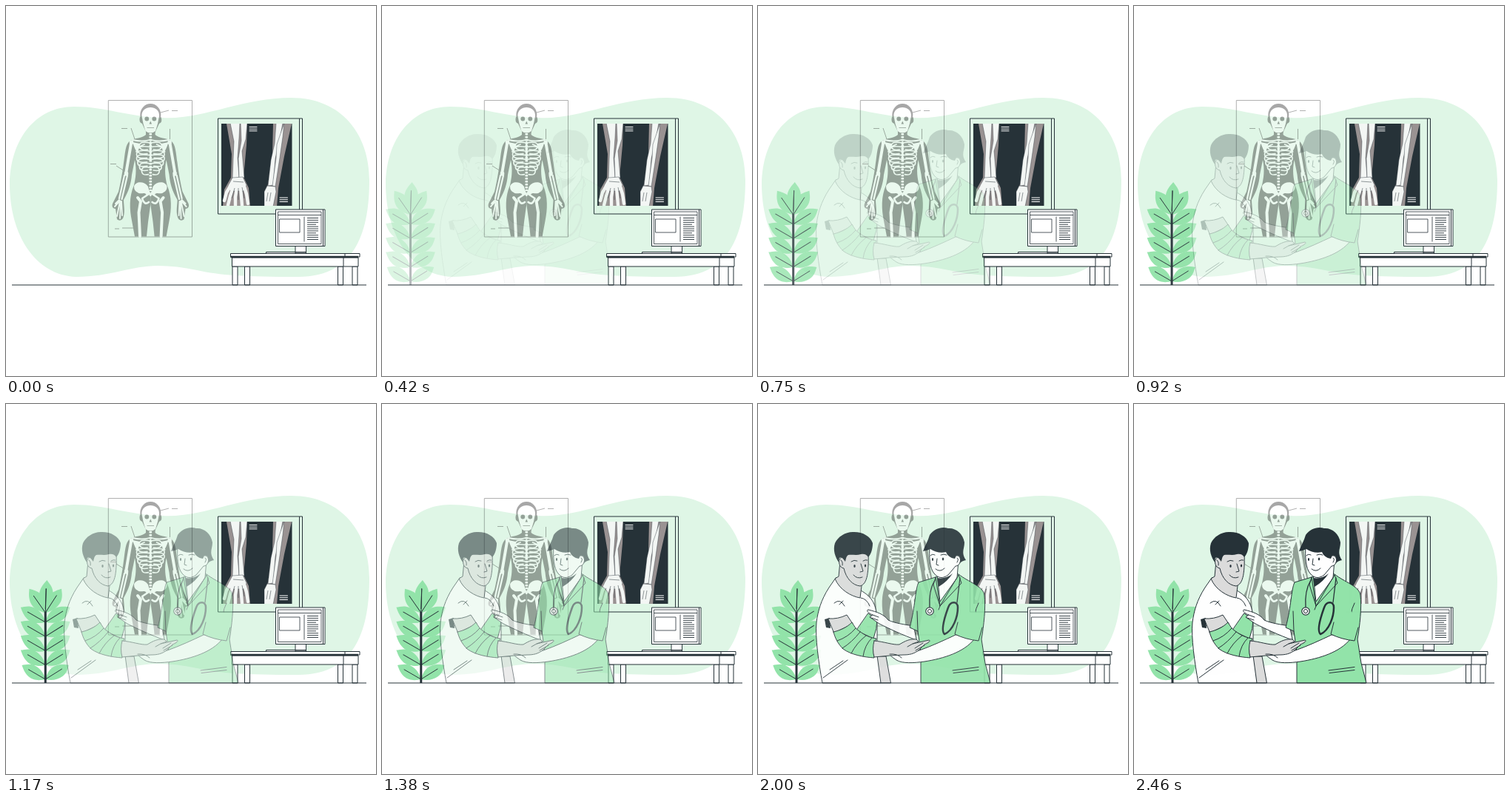
An HTML page that plays this animation: 500x500 px, repeating every 2.54 s.

```html
<!DOCTYPE html>
<html lang="en">
<head>
<meta charset="utf-8">
<title>Examination room</title>
<style>
html, body { margin: 0; height: 100%; overflow: hidden; background: #fff }
svg { display: block; width: 100vw; height: 100vh }
.ln { fill: none; stroke: #263238 }
.w { fill: #fff; stroke: #263238 }
.g { fill: #92e3a9; stroke: #263238 }
.s { fill: #dbdbdb; stroke: #263238 }
.d { fill: #263238 }
.bone { fill: none; stroke: #fff; stroke-linecap: round; stroke-linejoin: round }
</style>
</head>
<body>
<svg viewBox="0 0 500 500">
<defs>
  <g id="leaf">
    <path fill="#92e3a9" d="M0 0C-5-5-11-13-9-23C-7-31-3-35 0-39C3-35 8-31 9-23C10-13 5-5 0 0Z"/>
    <path class="ln" stroke-width=".9" d="M0 0L-.5-28"/>
  </g>
  <path id="side" d="M195.3 168H189V174C184 179 174 178 168 182C161 186 161 200 159 212C157 228 154 243 152 251L145 265C142 270 144 274 148 274L150 288C153 291 158 290 159 284C161 277 159 268 159 262C166 250 169 240 170 228L174 208C177 222 175 233 173 242C166 258 167 275 170 290L174 311.5H190L192 292L195.3 268Z"/>
  <g id="bones" class="bone">
    <path stroke-width="1.8" d="M194 181Q184 184 171 181M187 187Q178 190 176 197"/>
    <path fill="#fff" stroke="none" d="M171 184L181 186L178 199Q174 194 171 184ZM173 244C175 237 186 236 192 244L194 253L190 257C189 249 182 256 178 252Q173 250 173 244Z"/>
    <path stroke-width="4" d="M169 186L162.5 224"/>
    <path stroke-width="5.5" d="M169.5 184V184.5M162.5 226V227"/>
    <path stroke-width="2.3" d="M164 229L156.5 261M160 229L153 260"/>
    <path stroke-width="1.9" d="M154 263L147 271M154 264L150 284M155 264L154 287M156 264L157 283M153 262L148 267"/>
    <path stroke-width="2.6" d="M193 254L184 260Q187 270 193 265"/>
    <path stroke-width="4" d="M178 259L182 264L179.5 279L181 311"/>
  </g>
  <clipPath id="film"><rect x="291" y="159" width="95.500" height="111"/></clipPath>
</defs>

<path fill="#dff6e6" d="M5 240C6 180 40 136 92 136C135 136 165 150 212 151C264 154 320 124 385 124C455 124 491 175 491 235C491 300 475 366 395 366C320 366 290 364 258 357C240 353 222 351 205 351C170 351 140 366 95 366C40 364 5 310 5 240Z"/>

<!-- anatomy poster -->
<g opacity=".38" fill="#1a1a1a">
  <path fill="none" stroke="#1a1a1a" stroke-width=".9" d="M138.300 127.500H251.500V312H138.300ZM205 145L220 141M224 141.500H232M156 165.500H164M169 165L174 180M221.500 166V180M141 213.500H149M149 216L160 223M147 301H153M157 300H180"/>
  <ellipse cx="195.300" cy="147" rx="14" ry="15"/>
  <path d="M181 150Q179 157 184 159L190 172H201L207 159Q212 157 209.500 150Z"/>
  <use href="#side"/><use href="#side" transform="matrix(-1 0 0 1 390.6 0)"/>
  <use href="#bones"/><use href="#bones" transform="matrix(-1 0 0 1 390.6 0)"/>
  <path class="bone" stroke-width="3.600" stroke-dasharray="2.600 1.400" style="stroke-linecap:butt" d="M195.300 172V250"/>
  <path class="bone" stroke-width="2.400" d="M195.300 184V208M191 247L195.300 256L199.500 247"/>
  <g id="ribs" class="bone" stroke-width="1.600"></g>
  <path fill="#fff" d="M183.500 149C182 133 208.500 133 207 149L205 159L202 169Q195.300 174 188.500 169L185.500 159Z"/>
  <circle cx="190.300" cy="152.500" r="2.900"/><circle cx="200.300" cy="152.500" r="2.900"/>
  <path d="M195.300 155.500L197 159.500H193.500Z"/>
  <path fill="none" stroke="#1a1a1a" stroke-width=".8" d="M190.500 164.500H200"/>
</g>

<!-- light box -->
<path class="ln" d="M286.500 152H396.500V281H286.500ZM396.500 152H400.500V281H396.500"/>
<path class="d" d="M291 159H386.500V270H291Z"/>
<g clip-path="url(#film)">
  <path fill="#999292" d="M298 159H326L325 188L321 231L328 246L330 271H293L295 248L304 232L305 200ZM361 159H386L381 181L376 203L368 246L366 271H349V251L354 241L360 201Z"/>
  <g fill="#f3f6f4" stroke="#263238" stroke-width=".4">
    <path d="M303 158H316L315 178L313 205L315 232L306 233L307 207L308 183Z"/>
    <path d="M317 158H326L324 180L319 196L322 232L315 232L314 206L318 182Z"/>
    <path d="M306 232L320 231L325 242L321 250L303 250L300 243Z"/>
    <path d="M365 158H374L370 181L364 206L361 242L354 243L358 208L363 186Z"/>
    <path d="M376 158L374 177L370 205L364 244L360 243L365 205L366 187Z"/>
    <path d="M353 243L364 244L365 251L361 271H349V251Z"/>
  </g>
  <path class="bone" style="stroke:#f3f6f4" stroke-width="4.400" d="M304 242L298 252L295 263M307 245L303 257L300 269M312 246L310 258V270M317 245L318 257L319 270M321 241L325 254L327 267"/>
  <path class="ln" stroke-width=".5" d="M309 246L305 260M314 246V262M319 245L322 260M354 252L352 264M358 252L356 264M307 237L321 238"/>
</g>
<path class="bone" d="M329 163.500H339M329 166.200H339M329 168.800H339M370 259H380.500M370 261.800H380.500M370 264.500H380.500"/>

<!-- desk and monitor -->
<path class="w" d="M391 324H405.500V334H391ZM351.500 332.500H405.500V334.500H351.500Z"/>
<path class="w" d="M364.500 275H431V324.500H364.500ZM428.500 275V324.500"/>
<path class="ln" stroke-width=".8" d="M367.500 278H426V321.500H367.500ZM367.500 282.500H426M369.500 288H397V306H369.500ZM403 284.500V318.500"/>
<path id="text" class="ln" stroke-width=".9"/>
<path class="w" d="M306 352H313V377H306ZM322.500 352H329.500V377H322.500ZM448.500 352H455.500V377H448.500ZM468 352H475V377H468Z"/>
<path class="w" d="M305.500 340H476V352H305.500ZM456 340V352M303.500 334.500H478V339H303.500ZM458 334.500V339"/>
<path class="ln" stroke-width="2.400" d="M303.500 339H476"/>

<g id="plant">
  <g id="leaves"></g>
  <path class="ln" stroke-width="3" d="M52 281V377"/>
  <path class="ln" d="M53 250L52 285"/>
</g>

<g id="people" stroke-linejoin="round" stroke-linecap="round">
  <!-- patient -->
  <path class="s" d="M158 341H173L179.500 377H166Z"/>
  <path class="w" d="M105 235L96 248C85 265 81 280 79 295C77 315 82 350 87 377H166L161 340L161 291C160 272 155 261 139 252Z"/>
  <path class="s" d="M111 212L109 233L104 236C110 251 126 260 138 262L140 246Z"/>
  <path class="s" d="M115 208C108 204 107 221 116 222C119 236 128 245 138 246C148 243 150 228 149 195L120 191Z"/>
  <path class="d" d="M114 208C109 205 109 211 110 215C104 207 101 197 104 188C108 179 119 172 130 173C142 173 152 179 155 188C155 195 153 203 149 207C147 203 143 202 139 203C133 205 127 203 122 204C119 206 119 209 118 213Z"/>
  <ellipse class="d" cx="130.500" cy="219" rx="1.200" ry="2"/><ellipse class="d" cx="145" cy="218.500" rx="1.100" ry="2"/>
  <path class="ln" d="M126 213Q130 210 134 212M142 212Q145 210 148 211M139 216L142 226L138 227M129 231Q134 237 141 234M112 211Q115 213 114 218"/>
  <path class="ln" d="M103 269Q111 262 117 273M110 271L115 266M88 370L121 346M97 359L115 347M139 262Q147 263 151 273"/>
  <path class="d" d="M90 291L97 289L98 303L92 302Z"/>
  <path class="s" d="M95 290Q108 291 120 285L128 297L103 309Z"/>
  <path class="g" d="M149 283L161 291Q161 303 156 317L133 306Z"/>
  <path class="g" d="M102 308C111 306 120 302 127 295C130 300 132 304 137 307C145 313 152 316 160 317Q154 329 157 343C143 342 126 339 115 331C108 324 104 316 102 308Z"/>
  <path class="ln" d="M107 320Q122 315 132 303M114 330Q127 322 138 308M126 337Q133 323 146 313M142 341Q144 326 154 316"/>

  <!-- doctor -->
  <path class="w" d="M210 300C198 298 184 296 176 292C170 284 161 281 149 278C145 279 150 283 155 285L151 288L164 297C178 304 195 312 214 319Z"/>
  <path class="ln" d="M155 285L163 288M153 289L162 292"/>
  <path class="g" d="M240 234L217 241C212 252 213 272 205 302L216 307L220 335V377H314L307 350L302 318C305 300 308 275 306 258C304 246 285 241 271 230Z"/>
  <path class="w" d="M242 230L246 267L269 235L271 210Z"/>
  <path class="d" d="M242 235Q254 237 263 229Q256 240 244 247Z"/>
  <path class="ln" d="M240 234L246 273L271 231M240 234L237 244L246 273M271 231L275 242L246 273M216 307L215 280M246 273L244 278M298 269Q294 276 293 286M263 360L298 355.500M264 363.500L298 359.500"/>
  <path class="w" d="M267 312C252 319 235 327 218 333C205 338 190 331 180 334C172 336 180 341 187 346C195 351 211 350 225 348C251 344 279 335 292 318Z"/>
  <path class="s" d="M157 320C170 321 183 326 191 325C199 320 206 317 214 318L217 321L209 324L231 319C234 320 230 323 225 325L218 332C211 338 204 339 196 339L178 340L157 342Q154 331 157 320Z"/>
  <path class="ln" d="M209 324L202 328M223 323L212 330M225 326L213 333M178 338Q188 337 194 343"/>
  <path fill="#92e3a9" d="M266 311Q280 318 298 320L303 302L294 280L270 295Z"/>
  <path class="ln" d="M270 295L266 311Q280 318 298 320L303 302"/>

  <path class="w" d="M232 191C231 207 232 222 238 229C244 236 250 236 257 231L267 219C275 219 276 204 268 205L265 190Z"/>
  <path class="d" d="M223 199C225 192 230 185 232 177C238 168 249 165 257 168C267 167 277 175 279 187C279 196 274 201 281 211Q275 212 272 216C275 211 273 203 268 205L266 209C260 208 256 205 254 200C247 202 239 200 233 196Q229 198 223 199Z"/>
  <ellipse class="d" cx="236" cy="210" rx="1.100" ry="1.900"/><ellipse class="d" cx="250" cy="209.500" rx="1.200" ry="1.900"/>
  <path class="ln" d="M233 205Q235 202 239 204M247 204Q251 202 255 204M242 209L241 217L244 218M240 223Q246 228 252 222M269 208Q272 209 269 214"/>

  <path class="ln" stroke-width="1.300" d="M239 238C233 248 231 262 232 275M273 235L269 268"/>
  <path class="ln" stroke-width="2.500" d="M252 311C246 306 253 286 257 275C260 266 270 266 270 275C270 287 264 306 252 311Z"/>
  <circle class="w" cx="232" cy="280" r="5.200" stroke-width="1.200"/><circle class="w" cx="232" cy="280" r="2.600"/>
</g>
<path class="ln" d="M8 377H487"/>
</svg>
<script>
const $ = id => document.getElementById(id);
const LOOP = 2540;

const leaf = (y, turn, size = 1) =>
  `<use href="#leaf" transform="translate(52 ${y}) rotate(${turn}) scale(${size})"/>`;
const pair = (y, turn, size) => leaf(y, -turn, size) + leaf(y, turn, size);
let leaves = '';
for (let i = 0; i < 5; i++) leaves += pair(372 - i * 19.3, 59, i ? 1 : .95);
$('leaves').innerHTML = leaves + pair(282, 34) + leaf(277, 3);

let ribs = '';
for (let i = 0; i < 7; i++) {
  const y = 185 + i * 5.6, w = 12 + 7 * Math.sin((i + 1) * .45);
  for (const s of [-1, 1])
    ribs += `<path d="M195.3 ${y}q${s * w} -3 ${s * w} 4t${-s * w * .75} 5"/>`;
}
$('ribs').innerHTML = ribs;

let rows = '';
for (let i = 0; i < 11; i++) rows += `M407 ${286.5 + i * 2.9}h${i % 4 == 3 ? 12 : 15}`;
$('text').setAttribute('d', rows);

// CSS-style cubic timing curve, solved by bisection
const bezier = (x1, y1, x2, y2) => x => {
  const at = (a, b, s) => 3 * a * s * (1 - s) ** 2 + 3 * b * s * s * (1 - s) + s ** 3;
  let lo = 0, hi = 1;
  x = Math.min(1, Math.max(0, x));
  for (let i = 0; i < 24; i++) {
    const mid = (lo + hi) / 2;
    if (at(x1, x2, mid) < x) lo = mid; else hi = mid;
  }
  return at(y1, y2, hi);
};
const overshoot = bezier(.36, -.01, .5, 1.38);
const fade = bezier(.42, 0, .62, 1);

const start = performance.now();
function draw() {
  const t = Math.max(0, performance.now() - start) % LOOP;
  const slide = overshoot((t + 30) / 1500);
  $('plant').setAttribute('transform', `translate(${20 * (slide - 1)} 0)`);
  $('plant').setAttribute('opacity', Math.min(1, Math.max(0, slide)));
  $('people').setAttribute('opacity', fade(t / LOOP));
  requestAnimationFrame(draw);
}
draw();
</script>
</body>
</html>
```
